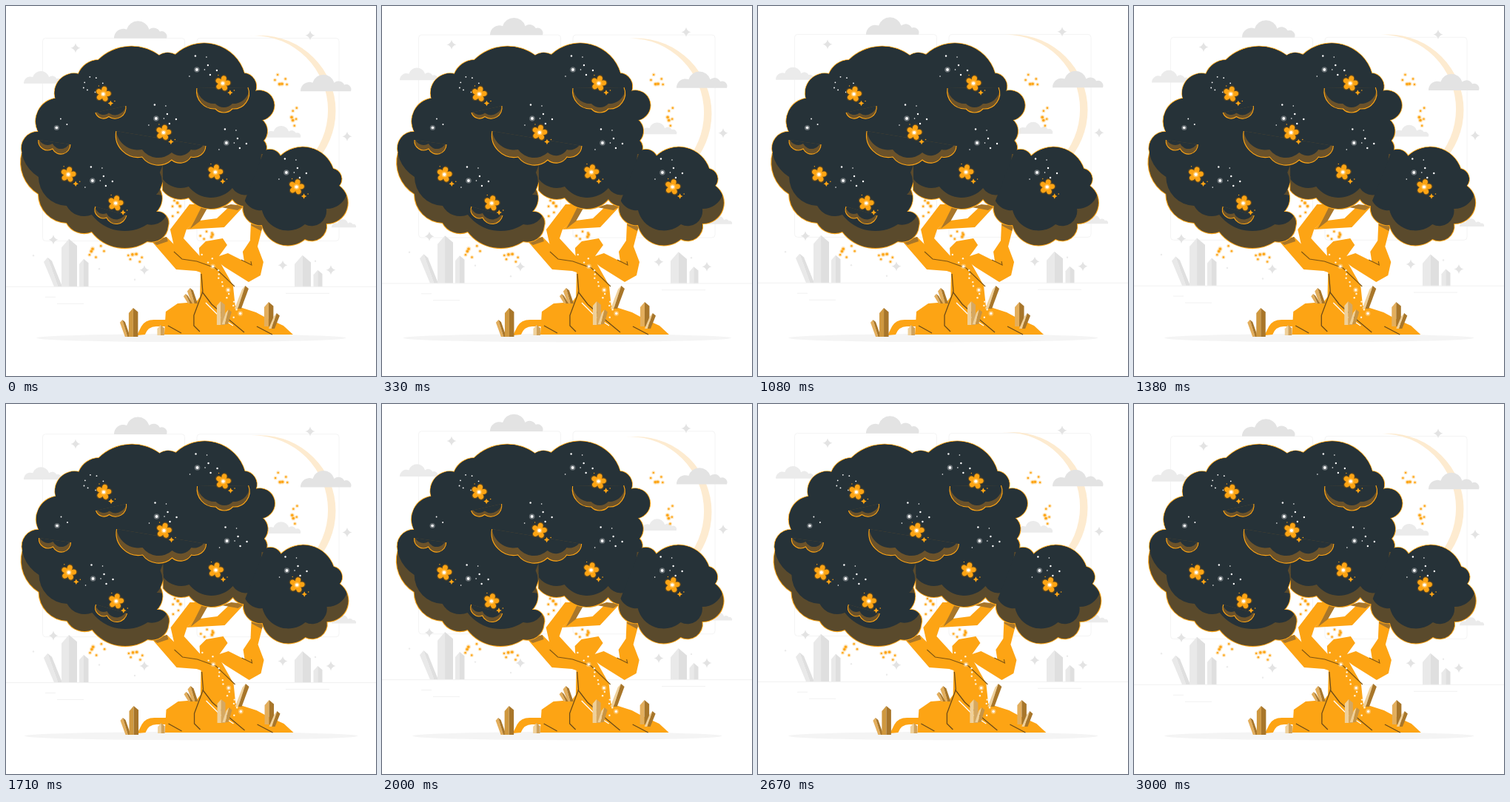
These frames come from a looping animation (500x500 px, 3040 ms). An HTML page with a canvas:

```html
<!DOCTYPE html>
<html lang="en">
<head>
<meta charset="utf-8">
<title>Night tree</title>
<style>
html, body { margin: 0; width: 100%; height: 100%; overflow: hidden; background: #fff; }
canvas { display: block; width: 100vw; height: 100vh; }
</style>
</head>
<body>
<canvas id="stage" width="500" height="500"></canvas>
<script>
const ctx = document.getElementById('stage').getContext('2d');
const ORANGE = '#fda414', DARK = '#263238', BROWN = '#5a4a2c', SHADE = '#a8762a';
const LOOP = 3040, CYCLE = 1.5, LEAD = 0.018;

// ---- helpers ----
// Arcs through [x, y, height]; a positive height bulges left of travel.
function bumps([px, py], list) {
  let d = `M${px} ${py}`;
  for (const [x, y, s = 0] of list) {
    const c = Math.hypot(x - px, y - py), h = Math.abs(s);
    const r = h ? (c * c / 4 + h * h) / (2 * h) : 0;
    d += h ? `A${r} ${r} 0 ${+(h > c / 2)} ${+(s > 0)} ${x} ${y}` : `L${x} ${y}`;
    [px, py] = [x, y];
  }
  return new Path2D(d);
}
const asPath = p => typeof p === 'string' ? new Path2D(p) : p;
function fill(color, path) {
  ctx.fillStyle = color;
  ctx.fill(asPath(path));
}
function stroke(color, width, path) {
  ctx.strokeStyle = color;
  ctx.lineWidth = width;
  ctx.stroke(asPath(path));
}
function dot(x, y, r, color) {
  ctx.fillStyle = color;
  ctx.beginPath();
  ctx.arc(x, y, r, 0, 7);
  ctx.fill();
}
function spark(x, y, r, color) {
  const k = r * 0.18;
  ctx.fillStyle = color;
  ctx.beginPath();
  ctx.moveTo(x, y - r);
  for (const [a, b, u, v] of [[1, -1, 1, 0], [1, 1, 0, 1], [-1, 1, -1, 0], [-1, -1, 0, -1]])
    ctx.quadraticCurveTo(x + a * k, y + b * k, x + u * r, y + v * r);
  ctx.fill();
}
function shifted(dx, dy, paint) {
  ctx.save();
  ctx.translate(dx, dy);
  paint();
  ctx.restore();
}
// Paints inside a path only.
function within(path, paint) {
  ctx.save();
  ctx.clip(path);
  paint();
  ctx.restore();
}
function random(seed) {
  return () => {
    seed = (seed * 16807) % 2147483647;
    return seed / 2147483647;
  };
}
// Evenly turned points around a centre, at random distances.
function scatter(x, y, rx, ry, n, seed) {
  const rnd = random(seed * 7919);
  return Array.from({ length: n }, (_, i) => {
    const a = i * 2.4 + seed, d = 0.35 + 0.65 * rnd();
    return [x + rx * d * Math.cos(a), y + ry * d * Math.sin(a)];
  });
}

// ---- motion, p runs from 0 to 1 in each cycle ----
const SHAKE = [0, -1, 2, -4, 4, -4, 4, -4, 2, -1, 0];
function shake(p) {
  const i = Math.floor(p * 10);
  return SHAKE[i] + (SHAKE[i + 1] - SHAKE[i]) * (p * 10 - i);
}
const float = p => -10 * (1 - Math.abs(1 - 2 * p));
const sway = p => 3 + 3 * Math.sin(2 * Math.PI * (p - 0.08));
const beat = p => p < 0.7 ? Math.sin(Math.PI * p / 0.35) ** 2 : 0;

// ---- background ----
function moon() {
  const hole = new Path2D('M0 0H500V400H0Z');
  hole.arc(334.5, 138.8, 100.6, 0, 7);
  ctx.save();
  ctx.clip(hole, 'evenodd');
  dot(343.5, 140, 102, '#fdebd0');
  ctx.restore();
}
function cloud(x, y, w, color) {
  const h = y - 0.17 * w;
  fill(color, bumps([x, y], [[x + 0.24 * w, h, 0.08 * w], [x + 0.67 * w, h, 0.16 * w],
    [x + 0.87 * w, h + 0.04 * w, 0.05 * w], [x + w, y, 0.06 * w]]));
}
function crystal(x, top, w, bottom, light, dark, lean = 0) {
  const m = x + w * 0.48, p = w * 0.55;
  fill(light, `M${x + lean} ${top + p}L${m + lean} ${top}L${m} ${bottom}H${x}Z`);
  fill(dark, `M${m + lean} ${top}L${x + w + lean} ${top + p * 0.8}L${x + w} ${bottom}H${m}Z`);
}
const GREY_STARS = [[94, 57], [411, 40], [461, 176.5], [64, 316], [187, 357], [374, 350.5], [439, 357]];

function frames() {
  for (const x of [49.5, 258]) {
    const box = new Path2D();
    box.roundRect(x, 43.7, 192, 274, 4);
    stroke('#f4f4f4', 1, box);
  }
}
function scenery() {
  cloud(146, 44, 71, '#e3e3e3');
  cloud(24, 105, 51, '#ebebeb');
  cloud(398, 115.5, 68, '#e3e3e3');
  cloud(350, 178, 48, '#ebebeb');
  cloud(440, 299.5, 33, '#ebebeb');
  for (const [x, y] of GREY_STARS) spark(x, y, 6.5, '#e3e3e3');
  for (const [x, y] of [[37, 337.5], [174, 370], [126, 355.5], [418, 345]]) dot(x, y, 1.2, '#ebebeb');
  const L = '#e9e9e9', D = '#dfdfdf';
  crystal(65, 340, 11, 379.5, L, D, -14);
  crystal(75, 315, 21, 379.5, L, D);
  crystal(99, 342, 12.5, 379.5, L, D);
  crystal(390, 337, 22, 380, L, D);
  crystal(415.5, 357, 12, 380, L, D);
  stroke('#f1f1f1', 1, 'M0 379.6H500M53 393.5H67M69 402.5H105M378 388.5H437');
}

// ---- foliage ----
// Each mass: outline, depth of its lower rim, height above which it has no rim.
const MASSES = [
  [bumps([44, 170], [[67, 125, 13], [98, 92, 13], [125, 73, 5], [207, 67, 15], [229, 66, 3],
    [322, 91, 27], [337, 115, 7], [346, 154, 21], [348, 182, 6], [350, 198, 3], [340, 235], [213, 235],
    [208, 248], [203, 278, 5], [219, 298, 7], [191, 318, 8], [116, 305, 15], [82, 293, 7],
    [44, 254, 11], [22, 198, 10], [44, 170, 9]]), 23, 200],
  [bumps([212, 200], [[345, 200], [340, 262], [306, 261, 9], [247, 259, 14], [212, 249, 6], [212, 200]]), 15, 230],
  [bumps([349, 196], [[371, 203, 5], [442, 220, 20], [450, 243, 7], [433, 294, 20], [404, 315, 11],
    [346, 296, 17], [322, 265, 11], [349, 196]]), 20, 245]
];
// Each fold: lower edge and rim depth.
const FOLDS = [
  [bumps([149, 169], [[184, 204, -13], [224, 208, -9], [250, 204, -6], [270, 189, -6]]), 10],
  [bumps([121, 144], [[139, 149.5, -5], [162, 135, -9]]), 5],
  [bumps([258, 111], [[283, 139, -9], [306, 139, -5], [327, 110, -10]]), 7],
  [bumps([44, 181], [[63, 193, -7], [87, 187, -10]]), 7],
  [bumps([121, 271], [[136, 286, -7], [163, 283, -10]]), 6]
];
function rim(path, depth) {
  within(path, () => shifted(0, -depth, () => fill(DARK, path)));
}
function foliage() {
  for (const [path] of MASSES) stroke(ORANGE, 2, path);
  for (const [path] of MASSES) fill(BROWN, path);
  for (const [path, depth, flat] of MASSES) {
    rim(path, depth);
    within(path, () => {
      ctx.fillStyle = DARK;
      ctx.fillRect(0, 0, 500, flat);
    });
  }
  for (const [path, depth] of FOLDS) {
    fill('#6b522a', path);
    rim(path, depth);
    stroke(ORANGE, 1.1, path);
  }
}

// ---- flowers and stars ----
const FLOWERS = [[131.5, 119], [293, 104.5], [213, 171], [84.3, 227.7], [148.3, 266.5], [283, 224.5], [392.7, 244.5]];
const GROUPS = [[258, 86], [203, 152], [298, 185], [117, 236], [379, 225]];
const GROUP = [[-2, -18.5], [13, -17], [15, -6], [10.5, 0], [27, 1], [-10, 9], [18, 7]];
const DUST = [[371, 102, 10, 10], [389, 149, 7, 14], [121, 331, 12, 9], [175, 339, 12, 8], [230, 273, 11, 13], [273, 310, 11, 6]]
  .flatMap(([x, y, rx, ry], i) => scatter(x, y, rx, ry, 6, i + 1));
const SPECKS = scatter(116, 107, 17, 12, 7, 9);
const rnd = random(4242);
const TRUNK_STARS = Array.from({ length: 17 }, (_, i) =>
  [268 + 2.7 * i + 12 * (rnd() - 0.3), 336 + 5.3 * i]);

function flower(x, y) {
  const petals = (r, color) => {
    for (let i = 0; i < 5; i++) {
      const a = i * Math.PI * 0.4 - 1.35;
      ctx.fillStyle = color;
      ctx.beginPath();
      ctx.ellipse(x + 6 * Math.cos(a), y + 6 * Math.sin(a), r * 1.1, r * 0.9, a, 0, 7);
      ctx.fill();
    }
  };
  petals(5.2, '#61491f');
  petals(3.9, ORANGE);
  dot(x, y, 3.6, '#ffc660');
  dot(x, y, 2.1, '#fff');
  spark(x + 10, y + 12.5, 3.8, ORANGE);
  dot(x + 15.5, y + 9.5, 0.8, ORANGE);
  dot(x - 6, y - 11, 0.7, ORANGE);
}
function glow(x, y, r) {
  dot(x, y, r * 2, 'rgba(255,255,255,.3)');
  dot(x, y, r, '#fff');
}
function lights() {
  for (const [x, y] of GROUPS) {
    glow(x, y, 1.9);
    GROUP.forEach(([dx, dy], i) => dot(x + dx, y + dy, i % 2 ? 0.8 : 1.2, '#fff'));
  }
  glow(68.5, 164.5, 1.8);
  dot(74, 152.5, 0.9, '#fff');
  dot(82.5, 160, 1, '#fff');
  for (const [x, y] of SPECKS) dot(x, y, 0.9, '#fff');
  for (const [x, y] of FLOWERS) flower(x, y);
  DUST.forEach(([x, y], i) => {
    const r = i % 3 ? 1.2 : 1.8;
    dot(x, y, r + 1.3, 'rgba(253,164,20,.28)');
    dot(x, y, r, ORANGE);
  });
}

// ---- trunk ----
function trunk() {
  // root and mound
  fill(ORANGE, 'M177 445L183 433Q188 424 200 424H217V433H203Q192 433 188 444Z');
  fill(ORANGE, 'M214 444L216 413L232 402L257 400L266 388L300 400L310 405L338 414L351 421L375 432L388 444Z');
  // left limb into the stem
  fill(ORANGE, 'M197 318L217 312L240 335L264 340L288 344L301 367L307 378L310 407L262 403L263 360L257 358L230 356Z');
  // middle limbs
  fill(ORANGE, 'M248 268L222 302L227 324L242 345L272 352L262 338L240 314L244 302L277 268Z');
  fill(ORANGE, 'M303 270L285 287L254 291L244 302L295 299L322 270Z');
  // right limb, bent back over the stem
  fill(ORANGE, 'M331 294L330 317L320 332L322 345L300 334L288 338L299 323L293 314L270 318L261 327L262 345L288 347L296 353L328 373L344 364L348 346L340 325L348 294Z');
  fill(SHADE, 'M249 301L256 288L265 270H274L262 291ZM197 318L217 312L219 318L204 323ZM331 295H348L345 304L332 297ZM291 272L304 268L322 270L313 276Z');
  stroke('#7d5412', 1.1, 'M227 332L238 342L258 345L283 354L309 379M318 343L332 350L331 345');
  stroke('#6d4b18', 1.3, 'M264 362L266 386L254 418L254 432L262 440M265 386L278 403L304 426L322 441M219 432L237 442M339 433L360 444');
  stroke('#fff', 1.3, 'M270 401L289 420L307 432');
}
function gems() {
  const L = '#e3ae5c', P = '#efd09a';
  crystal(161, 424, 7, 447, L, SHADE, -7);
  crystal(166, 408, 12.5, 447, '#cf983f', SHADE);
  crystal(204.5, 431, 9.5, 445, P, '#d0a25a');
  crystal(251, 381, 8, 402, L, SHADE, -6);
  crystal(246, 389, 6, 402, L, SHADE, -6);
  crystal(309, 378, 9, 409, P, SHADE, 10);
  crystal(285, 399, 11, 431, P, '#d5a862');
  crystal(292, 410, 8, 430, P, '#c79444', 5);
  crystal(349, 400, 12.5, 433, L, SHADE);
  crystal(355, 415, 8, 436, P, SHADE, 7);
}
function tree() {
  trunk();
  gems();
  TRUNK_STARS.forEach(([x, y], i) => i % 6 === 3 ? glow(x, y, 1.7) : dot(x, y, 1.2, '#fff4dc'));
  foliage();
  lights();
}

function draw(ms) {
  // 24 steps a second
  const t = Math.floor((ms + 4) * 0.024) / 24 + LEAD;
  const p = (t / CYCLE) % 1;
  ctx.fillStyle = '#fff';
  ctx.fillRect(0, 0, 500, 500);
  shifted(0, float(p), frames);
  shifted(0, sway(p), moon);
  shifted(0, float(p), scenery);
  ctx.fillStyle = '#f4f4f4';
  ctx.beginPath();
  ctx.ellipse(250.3, 448.6, 209 + 17 * beat(p), 5.6, 0, 0, 7);
  ctx.fill();
  shifted(shake(p), 0, tree);
}
const begin = performance.now();
function tick() {
  draw((performance.now() - begin) % LOOP);
  requestAnimationFrame(tick);
}
tick();
</script>
</body>
</html>
```
